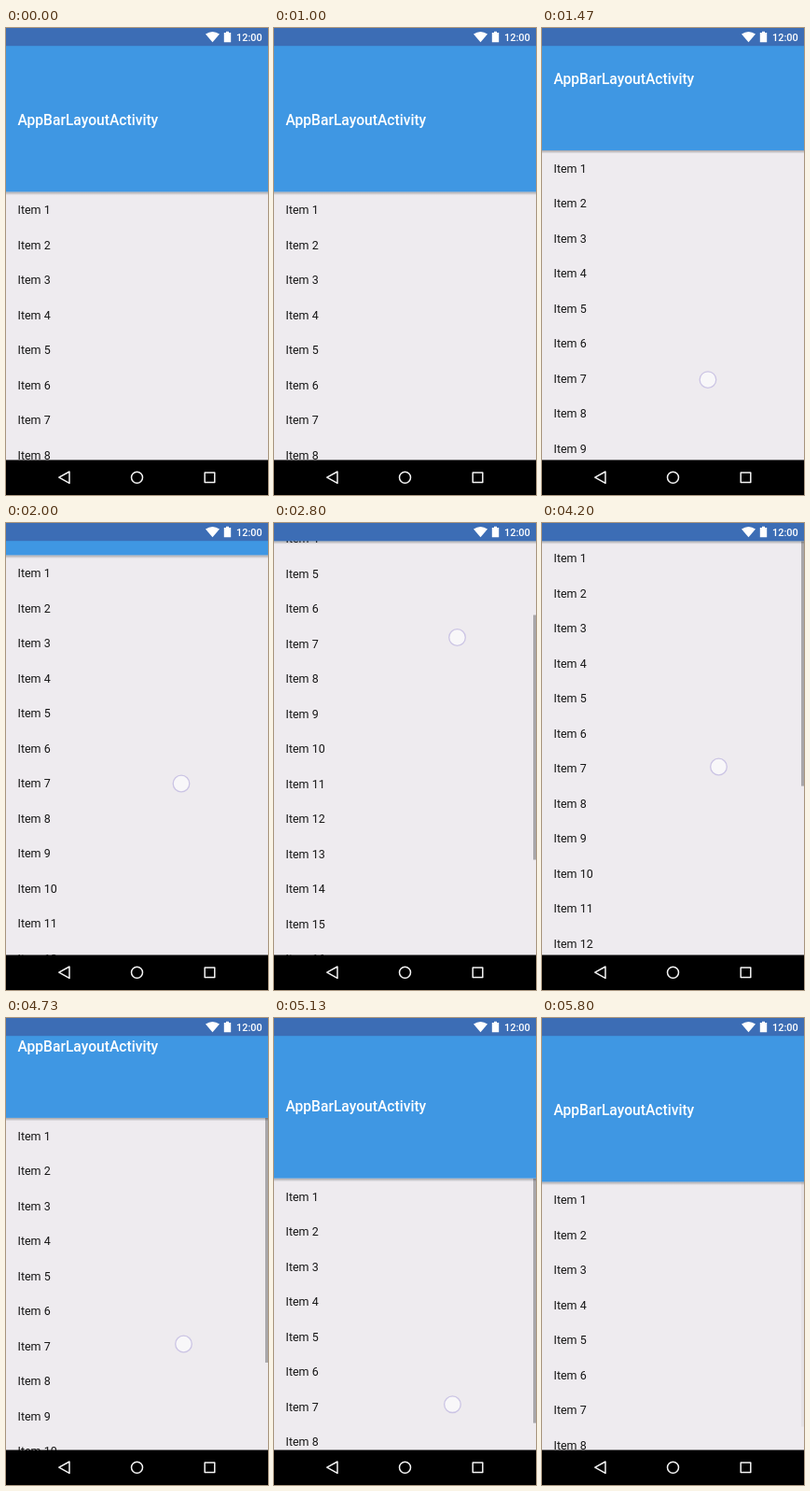
Write an HTML page that moves like this. It is 281x500 px and loops after 5.94 s.

```html
<!DOCTYPE html>
<html lang="en">
<head>
<meta charset="utf-8">
<title>Collapsing app bar</title>
<style>
  html, body { margin: 0; width: 100%; height: 100%; overflow: hidden; background: #eeebef; }
  svg { display: block; width: 100%; height: 100%; }
  text { font-family: Roboto, sans-serif; }
  #list text { font-size: 12.5px; fill: #161616; }
  .medium { font-weight: 500; fill: #fff; }
</style>
</head>
<body>
<svg viewBox="0 0 281 500">
  <defs>
    <linearGradient id="shade" x2="0" y2="1">
      <stop stop-color="#000" stop-opacity=".3"/>
      <stop offset="1" stop-color="#000" stop-opacity="0"/>
    </linearGradient>
  </defs>
  <rect width="281" height="500" fill="#eeebef"/>
  <g id="list"></g>
  <rect id="thumb" x="278" width="3" fill="#a9a7aa"/>
  <g id="appBar">
    <rect y="175.4" width="281" height="3.6" fill="url(#shade)"/>
    <rect y="19" width="281" height="156.4" fill="#3f97e3"/>
    <text class="medium" x="12.5" y="104" font-size="15.625">AppBarLayoutActivity</text>
  </g>
  <circle id="touch" r="8.8" fill="#fff" fill-opacity=".6" stroke="#cbc4e4" stroke-width="1.3"/>

  <rect width="281" height="19.2" fill="#3c6db5"/>
  <g fill="#fff">
    <path d="M214 6.6Q221.5 1.6 229 6.6L221.5 15.2Z"/>
    <path d="M236 3.7h3v1.2h2.2v10.3h-7.4V4.9H236Z"/>
  </g>
  <text class="medium" x="247" y="14" font-size="10.94">12:00</text>

  <rect y="462.5" width="281" height="37.5"/>
  <g fill="none" stroke="#f4f4f4" stroke-width="1.5" stroke-linejoin="round">
    <path d="M56.8 481.2L68 475V487.4Z"/>
    <circle cx="140.5" cy="481.2" r="6"/>
    <rect x="213.2" y="476" width="10.6" height="10.6"/>
  </g>
</svg>
<script>
const LOOP = 5940, FRAME = 1000 / 15;
const ITEMS = 20, ITEM_HEIGHT = 37.5;
const BAR_BOTTOM = 175.4, COLLAPSE = 156.25, VIEW_HEIGHT = 443.3;
const THUMB_RATIO = VIEW_HEIGHT / (ITEMS * ITEM_HEIGHT);

// time, scroll distance, finger x, finger y
const drag = [
  [1200, 0, 174, 421],
  [1470, 45, 178, 376],
  [2000, 141, 188, 279],
  [2800, 290.5, 196.5, 122.5],
  [3130, 316, 197, 99],
  [3600, 257.5, 190, 161],
  [4200, 157, 189.5, 261],
  [4730, 69, 190.5, 348.5],
  [5220, 0, 191.5, 417.5]
];

const [list, thumb, appBar, touch] =
  ["list", "thumb", "appBar", "touch"].map(id => document.getElementById(id));

for (let i = 0; i < ITEMS; i++) {
  const label = document.createElementNS("http://www.w3.org/2000/svg", "text");
  label.setAttribute("x", 12.5);
  label.setAttribute("y", 199.3 + i * ITEM_HEIGHT);
  label.textContent = `Item ${i + 1}`;
  list.append(label);
}
thumb.setAttribute("height", VIEW_HEIGHT * THUMB_RATIO);

const clamp = (v, lo, hi) => Math.min(hi, Math.max(lo, v));

// Slope at a key: zero at the ends and at turning points
function slope(i, col) {
  if (i === 0 || i === drag.length - 1) return 0;
  const [a, b, c] = [drag[i - 1], drag[i], drag[i + 1]];
  const before = (b[col] - a[col]) / (b[0] - a[0]);
  const after = (c[col] - b[col]) / (c[0] - b[0]);
  return before * after <= 0 ? 0 : 2 * before * after / (before + after);
}

// Smooth cubic through the keys of one column
function sample(time, col) {
  const t = clamp(time, drag[0][0], drag.at(-1)[0]);
  const i = Math.max(1, drag.findIndex(key => key[0] >= t));
  const a = drag[i - 1], b = drag[i], span = b[0] - a[0];
  const u = (t - a[0]) / span, v = 1 - u;
  return v * v * (1 + 2 * u) * a[col] + u * u * (3 - 2 * u) * b[col]
    + span * u * v * (v * slope(i - 1, col) - u * slope(i, col));
}

const move = (node, x, y) => node.setAttribute("transform", `translate(${x} ${y})`);

function draw(now) {
  const t = Math.floor((now % LOOP + 3.5) / FRAME) * FRAME;
  const scroll = sample(t, 1);
  const collapsed = Math.min(scroll, COLLAPSE);
  const scrolled = scroll - collapsed;

  move(list, 0, -scroll);
  move(appBar, 0, -collapsed);
  move(thumb, 0, BAR_BOTTOM - collapsed + scrolled * THUMB_RATIO);
  const thumbShown = t > 3000 || scrolled > 0;
  thumb.setAttribute("opacity", thumbShown ? clamp((5835 - t) / 235, 0, 1) : 0);

  move(touch, sample(t, 2), sample(t, 3));
  touch.setAttribute("opacity", t > 1190 && t < 5370 ? 1 : 0);
}

function tick() {
  draw(performance.now());
  requestAnimationFrame(tick);
}
tick();
</script>
</body>
</html>
```
